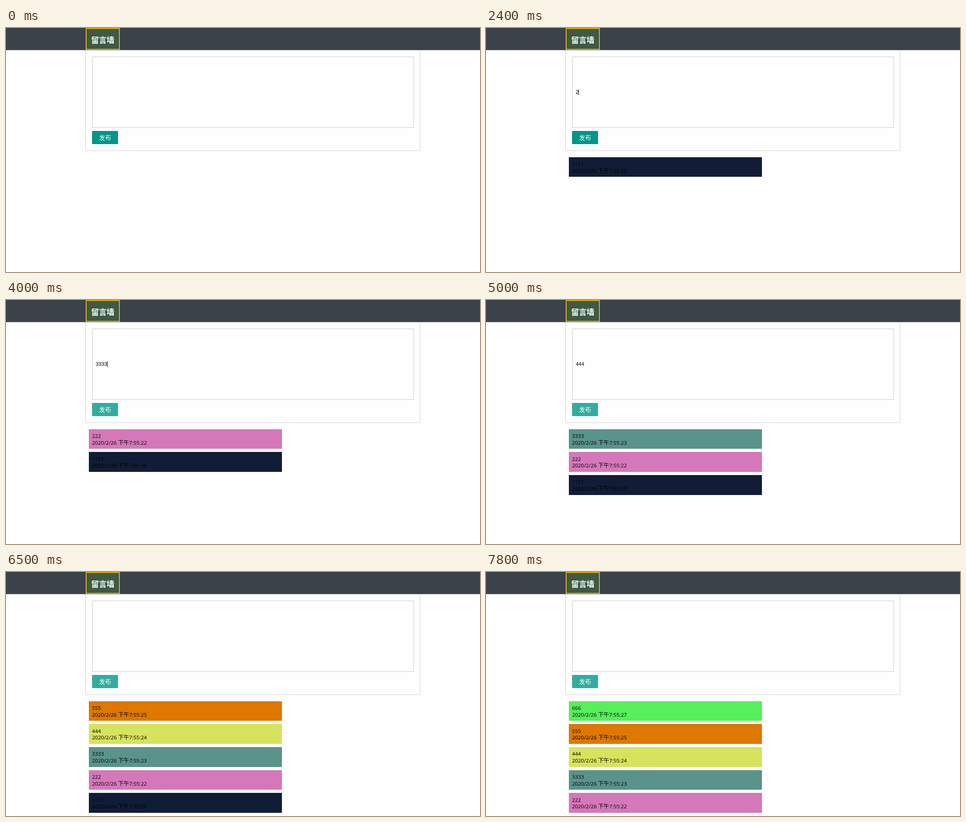
An HTML page with a canvas that plays this animation: 1041 px wide and 538 px high, repeating every 8000 ms.

```html
<!DOCTYPE html>
<html lang="zh-CN">
<head>
<meta charset="utf-8">
<title>留言墙</title>
<style>
  html, body { margin: 0; width: 100%; height: 100%; overflow: hidden; background: #fefefe; }
  canvas { display: block; }
</style>
</head>
<body>
<canvas id="stage" width="1041" height="538"></canvas>
<script>
const ctx = document.getElementById('stage').getContext('2d');
const LOOP = 8000;
const LATIN = '11.45px "Open Sans", "Noto Sans", sans-serif';
const CJK = '"Noto Sans CJK SC", "Noto Sans CJK", sans-serif';
const INPUT = '11.25px "Liberation Sans", Arial, sans-serif';

// Times in ms: focus, one per key, hover fade steps, blur, post, pointer leaving the button
const messages = [
  { text: '1111', sec: 20, color: '#111d36', focus: 700, keys: [800, 1000, 1100, 1300],
    hover: [1100, 1300, 1400], blur: 1600, post: 1700, leave: 1800 },
  { text: '222', sec: 22, color: '#d478b9', focus: 2000, keys: [2400, 2600, 2700],
    hover: [2700, 2800], blur: 3000, post: 3100, leave: 3200 },
  { text: '3333', sec: 23, color: '#5a938b', focus: 3200, keys: [3400, 3600, 3700, 3800],
    hover: [3900, 4000], blur: 4100, post: 4200, leave: 4300 },
  { text: '444', sec: 24, color: '#d6e35d', focus: 4300, keys: [4500, 4600, 4800],
    hover: [4800, 4900], blur: 5000, post: 5200, leave: 5300 },
  { text: '555', sec: 25, color: '#de7800', focus: 5300, keys: [5500, 5700, 5900],
    hover: [6200, 6300], blur: 6300, post: 6500, leave: 6600 },
  { text: '666', sec: 27, color: '#57ef5b', focus: 6800, keys: [6900, 7100, 7300],
    hover: [7300], blur: 7700, post: 7800, leave: LOOP }
];

function rect(x, y, w, h, color) {
  ctx.fillStyle = color;
  ctx.fillRect(x, y, w, h);
}

function frame(x, y, w, h, color, width = 1) {
  ctx.strokeStyle = color;
  ctx.lineWidth = width;
  ctx.strokeRect(x + width / 2, y + width / 2, w - width, h - width);
}

// Draws text and returns the x where it ends
function write(text, x, y, font, color = '#000') {
  ctx.font = font;
  ctx.fillStyle = color;
  ctx.fillText(text, x, y);
  return x + ctx.measureText(text).width;
}

function drawHeader() {
  rect(0, 0, 1041, 48, '#3b4249');
  rect(0, 48, 1041, 1, '#6a7075');
  rect(175, 0, 75, 48, '#3d5a43');
  frame(175, 0, 75, 48, '#e5ae17', 2);
  write('留言墙', 187, 33, `bold 17px ${CJK}`, '#fff');
}

function drawForm(typed, caret, hover) {
  frame(174, 40, 736, 231, '#d2d2d2');
  frame(189, 63, 707, 157, '#cccccc');
  const end = write(typed, 197, 145, INPUT);
  if (caret) {
    const top = typed ? 135 : 136;
    rect(Math.floor(end), top, 1, 148 - top, '#000');
  }
  const mix = (a, b) => Math.round(a + (b - a) * hover);
  rect(189, 227, 57, 29, `rgb(${mix(0, 51)},${mix(150, 171)},${mix(136, 159)})`);
  write('发布', 204.5, 247, `13.2px ${CJK}`, '#fff');
}

function drawCard(msg, row) {
  const dy = row * 50.65;
  const top = Math.round(284.6 + dy);
  rect(182, top, 424, Math.round(328.2 + dy) - top, msg.color);
  write(msg.text, 189, Math.round(304 + dy), LATIN);
  const y = Math.round(318.7 + dy);
  let x = write('2020/2/26 ', 189, y, LATIN);
  x = write('下午', x, y, `12.15px ${CJK}`);
  write(`7:55:${msg.sec}`, x, y, LATIN);
}

function draw(t) {
  const passed = times => times.filter(k => t >= k).length;
  let typed = '', caret = false, hover = 0;
  for (const m of messages) {
    if (t >= m.focus && t < m.blur) caret = true;
    if (t < m.post) typed += m.text.slice(0, passed(m.keys));
    if (t < m.leave) hover = Math.max(hover, passed(m.hover) / m.hover.length);
  }
  rect(0, 0, 1041, 538, '#fefefe');
  drawForm(typed, caret, hover);
  drawHeader();
  messages.filter(m => t >= m.post).reverse().forEach(drawCard);
}

const start = performance.now();
function tick() {
  draw((performance.now() - start) % LOOP);
  requestAnimationFrame(tick);
}
tick();
</script>
</body>
</html>
```
